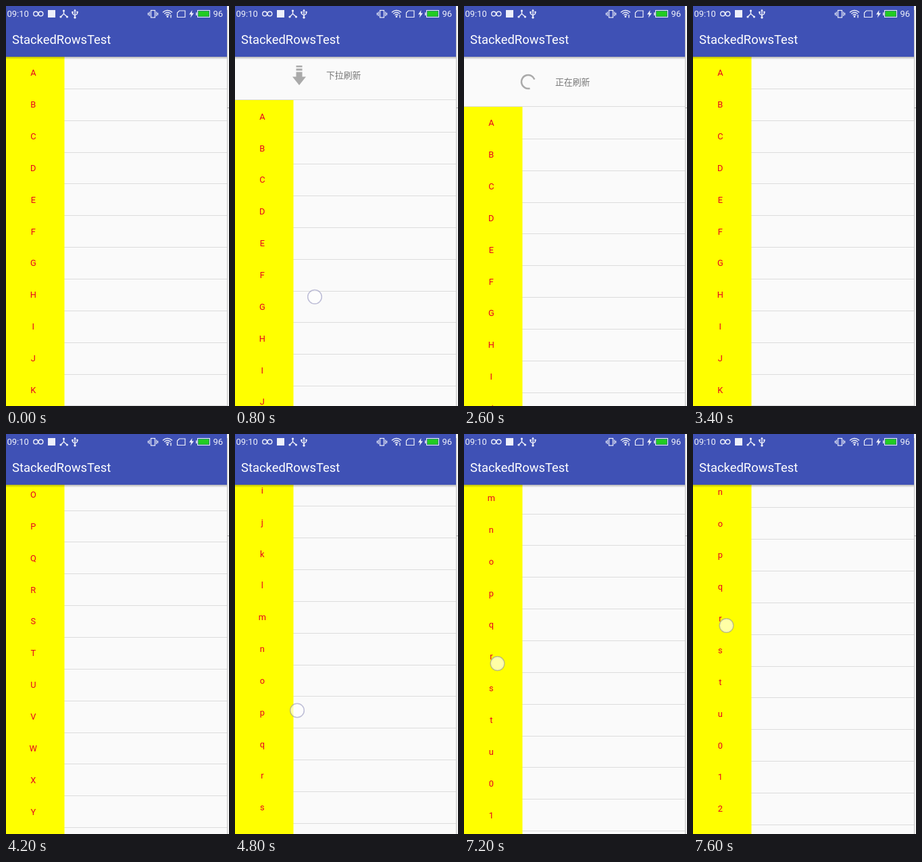
Animation, 330 px wide and 591 px high, one loop 7.8 s. Source, as an HTML page with a canvas:

```html
<!DOCTYPE html>
<html lang="zh">
<head>
<meta charset="utf-8">
<title>StackedRowsTest</title>
<style>
  html, body { margin: 0; width: 100%; height: 100%; overflow: hidden; background: #fafafa; }
  canvas { display: block; width: 330px; height: 591px; }
</style>
</head>
<body>
<canvas id="stage"></canvas>
<script>
const W = 330, H = 591, APP_W = 327, BAR = 75, ROW = 46.85;
const LOOP = 7800, STEP = 200;
const LATIN = 'Roboto, "Noto Sans", sans-serif';
const CJK = '"Noto Sans CJK SC", "Noto Sans CJK", sans-serif';
const LAST = 'u'.charCodeAt(0) - 65;

const canvas = document.getElementById('stage');
const c = canvas.getContext('2d');
const dpr = window.devicePixelRatio || 1;
canvas.width = W * dpr;
canvas.height = H * dpr;

const easeOut = (u, k) => 1 - Math.pow(1 - u, k);
const smooth = u => u * u * (3 - 2 * u);

function box(x, y, w, h, color) {
  c.fillStyle = color;
  c.fillRect(x, y, w, h);
}

function text(s, x, y, size, color, align = 'left', family = LATIN) {
  c.font = `${size}px ${family}`;
  c.textAlign = align;
  c.fillStyle = color;
  c.fillText(s, x, y);
}

function path(points, close) {
  c.beginPath();
  points.forEach(([x, y]) => c.lineTo(x, y));
  if (close) c.closePath();
}

function line(...points) {
  path(points);
  c.stroke();
}

function arc(x, y, r, from = 0, to = Math.PI * 2) {
  c.beginPath();
  c.arc(x, y, r, from, to);
}

// Everything that moves, as a function of time
function pose(t) {
  const p = { pull: 0, scroll: 0, mode: '', touch: null, loaded: t >= 5800 };
  if (t >= 400 && t < 2000) {
    p.pull = 98 * easeOut((t - 200) / 1600, 2.283);
    p.mode = p.pull > 74 ? 'release' : 'pull';
    p.touch = [118 - 19 * (t - 800) / 1000, 204 + 3.5 * p.pull];
  } else if (t >= 2000 && t < 3400) {
    p.pull = t < 2800 ? 74 : 74 * Math.pow((3400 - t) / 600, 2);
    p.mode = 'busy';
  } else if (t >= 4000) {
    p.scroll = 1889.5 * smooth(Math.min(1, (t - 3800) / 1000));
    if (t >= 4800) {
      const d = 106 * easeOut(Math.min(1, (t - 4800) / 1000), 2);
      p.scroll += d;
      if (t < 5400) p.touch = [92, 408.5 - d];
    }
    if (t >= 7200) {
      const d = 126.3 * easeOut((t - 7000) / 600, 2);
      p.scroll += d;
      p.touch = [49.5, 409.3 - d];
    }
  }
  return p;
}

function label(i, loaded) {
  if (i <= LAST) return String.fromCharCode(65 + i);
  return loaded && i - LAST <= 10 ? String(i - LAST - 1) : null;
}

function drawList(p) {
  const top = BAR + p.pull - p.scroll;
  box(0, Math.round(top) - 1, APP_W, 1, '#dcdcdc');
  for (let i = Math.max(0, Math.floor((BAR - top) / ROW)); top + i * ROW < H; i++) {
    const s = label(i, p.loaded);
    if (s === null) break;
    const y = Math.round(top + i * ROW), end = Math.round(top + (i + 1) * ROW);
    box(0, y, 86.5, end - y, '#ffff00');
    box(0, end, APP_W, 1, '#dcdcdc');
    text(s, 40.3, top + i * ROW + 28.3, 12.8, '#e6001f', 'center');
  }
}

function drawHeader(p, t) {
  if (!p.mode) return;
  const y = BAR + p.pull - 37;
  const words = { pull: '下拉刷新', release: '释放立即刷新', busy: '正在刷新' };
  text(words[p.mode], 160.7, y + 5, 12.9, '#777', 'center', CJK);
  c.save();
  c.translate(95, y);
  if (p.mode === 'busy') {
    c.rotate(t / 1000 * Math.PI * 1.7);
    c.strokeStyle = '#aaa';
    c.lineWidth = 2.5;
    arc(0, 0, 10, 0, 4.6);
    c.stroke();
  } else {
    if (p.mode === 'release') c.scale(1, -1);
    box(-4.5, -14.5, 9, 2.5, '#aaa');
    box(-4.5, -10, 9, 3, '#aaa');
    box(-4.5, -5, 9, 8, '#aaa');
    path([[-10, 2], [10, 2], [0, 14.5]], true);
    c.fill();
  }
  c.restore();
}

function drawStatus() {
  const ink = '#eef0fa';
  text('09:10', 1.5, 16, 13, ink);
  text('96', 306.5, 16, 13, ink);
  c.strokeStyle = c.fillStyle = ink;
  c.lineWidth = 1.4;

  // loop
  arc(44, 11.5, 3.3); c.stroke();
  arc(51.5, 11.5, 3.3); c.stroke();

  box(62, 6, 11, 11, ink);

  // three-way node
  line([85.5, 7], [85.5, 11.5], [81, 16]);
  line([85.5, 11.5], [90.5, 16]);
  for (const [x, y] of [[85.5, 7], [81, 16], [90.5, 16]]) { arc(x, y, 1.6); c.fill(); }

  // cable
  line([102, 6], [102, 17]);
  line([98.5, 9], [98.5, 11.5], [102, 14], [105.5, 11.5], [105.5, 9]);
  path([[100, 7.5], [104, 7.5], [102, 4.5]], true); c.fill();
  arc(102, 17, 1.7); c.fill();
  box(97.3, 8, 2.4, 2.4, ink);
  arc(105.5, 9, 1.3); c.fill();

  // vibrate
  c.lineWidth = 1.2;
  c.strokeRect(214.5, 6.5, 6, 10.5);
  line([212.3, 8.5], [212.3, 15]);
  line([222.7, 8.5], [222.7, 15]);
  line([210.4, 10], [210.4, 13.5]);
  line([224.6, 10], [224.6, 13.5]);

  // wifi
  c.lineWidth = 1.4;
  for (const r of [3.5, 6.5, 9.5]) { arc(239, 16, r, -2.4, -0.74); c.stroke(); }
  arc(239, 15.7, 1.4); c.fill();
  line([244, 13], [244, 17.5]);

  // card
  c.lineWidth = 1.2;
  path([[256.5, 7], [265, 7], [265, 16.5], [253.5, 16.5], [253.5, 10]], true);
  c.stroke();

  // bolt
  path([[275.5, 6], [271, 12.5], [274, 12.5], [272.8, 17.5], [278, 10.6], [275, 10.6]], true);
  c.fill();

  // battery
  box(281, 9.5, 1.5, 4.5, ink);
  c.lineWidth = 1;
  c.strokeRect(283.5, 6.5, 18, 10);
  box(284.5, 7.5, 16, 8, '#22cc22');
}

function drawBar() {
  const shade = c.createLinearGradient(0, BAR, 0, BAR + 4);
  shade.addColorStop(0, 'rgba(0,0,0,.28)');
  shade.addColorStop(1, 'rgba(0,0,0,0)');
  box(0, BAR, APP_W, 4, shade);
  box(0, 0, APP_W, BAR, '#3f51b5');
  drawStatus();
  text('StackedRowsTest', 9, 56, 18.4, '#fff');
}

function drawTouch([x, y]) {
  arc(x, y, 10.3);
  c.fillStyle = 'rgba(255,255,255,.65)';
  c.fill();
  c.strokeStyle = 'rgba(130,130,180,.5)';
  c.lineWidth = 1.5;
  c.stroke();
}

function drawEdge() {
  box(APP_W, 0, 3, H, '#f4f4f4');
  box(APP_W, 6, 1, H, '#c4c4c4');
  box(APP_W, 150, 3, 1, '#aaa');
}

function draw(t) {
  const p = pose(t);
  c.setTransform(dpr, 0, 0, dpr, 0, 0);
  box(0, 0, W, H, '#fafafa');
  drawList(p);
  drawHeader(p, t);
  drawBar();
  if (p.touch) drawTouch(p.touch);
  drawEdge();
}

const start = performance.now();
function tick() {
  const t = (performance.now() - start) % LOOP;
  draw(Math.floor(t / STEP) * STEP);
  requestAnimationFrame(tick);
}
tick();
</script>
</body>
</html>
```
